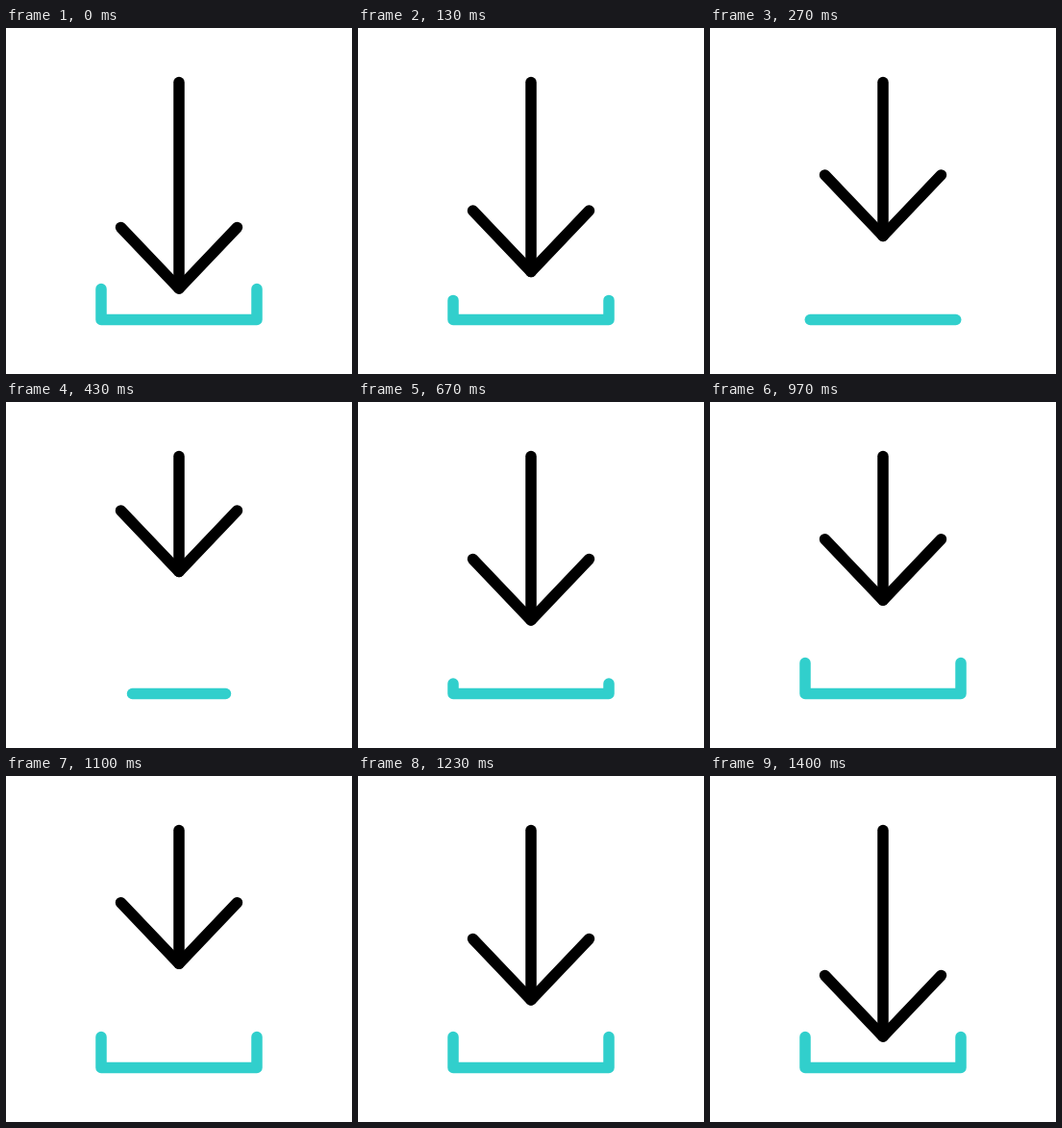
These frames come from a looping animation (360 by 360 pixels, 2000 ms). An HTML page with a canvas:

```html
<!DOCTYPE html>
<html lang="en">
<head>
<meta charset="utf-8">
<title>Download arrow</title>
<style>
  html, body { margin: 0; width: 100%; height: 100%; overflow: hidden; background: #fff; }
  canvas { display: block; width: 360px; height: 360px; }
</style>
</head>
<body>
<canvas id="stage" width="360" height="360"></canvas>
<script>
const ctx = document.getElementById('stage').getContext('2d');
const FPS = 30, LOOP = 60;

// Keys are [time in ticks, value]
const LIFT = [[0, 0], [15, 99.3], [23, 18.5], [31.75, 79], [42, 0]];
const TRIM = [[0, 0], [15, 0.6], [23, 0]];

const TRAY = { left: 99, right: 261, top: 271.5, bottom: 303.5 };
const HALF_BASE = (TRAY.right - TRAY.left) / 2;
const HALF_TRAY = HALF_BASE + TRAY.bottom - TRAY.top;

const ease = t => t * t * (3 - 2 * t);

function valueAt(keys, tick) {
  const next = keys.findIndex(key => key[0] > tick);
  if (next < 0) return keys[keys.length - 1][1];
  const [t0, v0] = keys[next - 1], [t1, v1] = keys[next];
  return v0 + (v1 - v0) * ease((tick - t0) / (t1 - t0));
}

function polyline(color, points) {
  ctx.strokeStyle = color;
  ctx.beginPath();
  for (const [x, y] of points) ctx.lineTo(x, y);
  ctx.stroke();
}

function drawTray(trim) {
  const reach = HALF_TRAY * (1 - trim);
  const half = Math.min(reach, HALF_BASE);
  const arm = Math.max(0, reach - HALF_BASE);
  const left = 180 - half, right = 180 + half, y = TRAY.bottom;
  const points = [[left, y], [right, y]];
  if (arm > 0) {
    points.unshift([left, y - arm]);
    points.push([right, y - arm]);
  }
  polyline('#31cfcc', points);
}

function drawArrow(lift) {
  const tip = 271 - lift, wing = 207.5 - lift;
  polyline('#000', [[180, 56.5], [180, tip]]);
  polyline('#000', [[119.5, wing], [180, tip], [240.5, wing]]);
}

function render(now) {
  const tick = Math.floor(now * FPS / 1000 + 0.11) % LOOP;
  ctx.fillStyle = '#fff';
  ctx.fillRect(0, 0, 360, 360);
  ctx.lineWidth = 11.5;
  ctx.lineCap = ctx.lineJoin = 'round';
  drawTray(valueAt(TRIM, tick));
  drawArrow(valueAt(LIFT, tick));
  requestAnimationFrame(render);
}

render(0);
</script>
</body>
</html>
```
